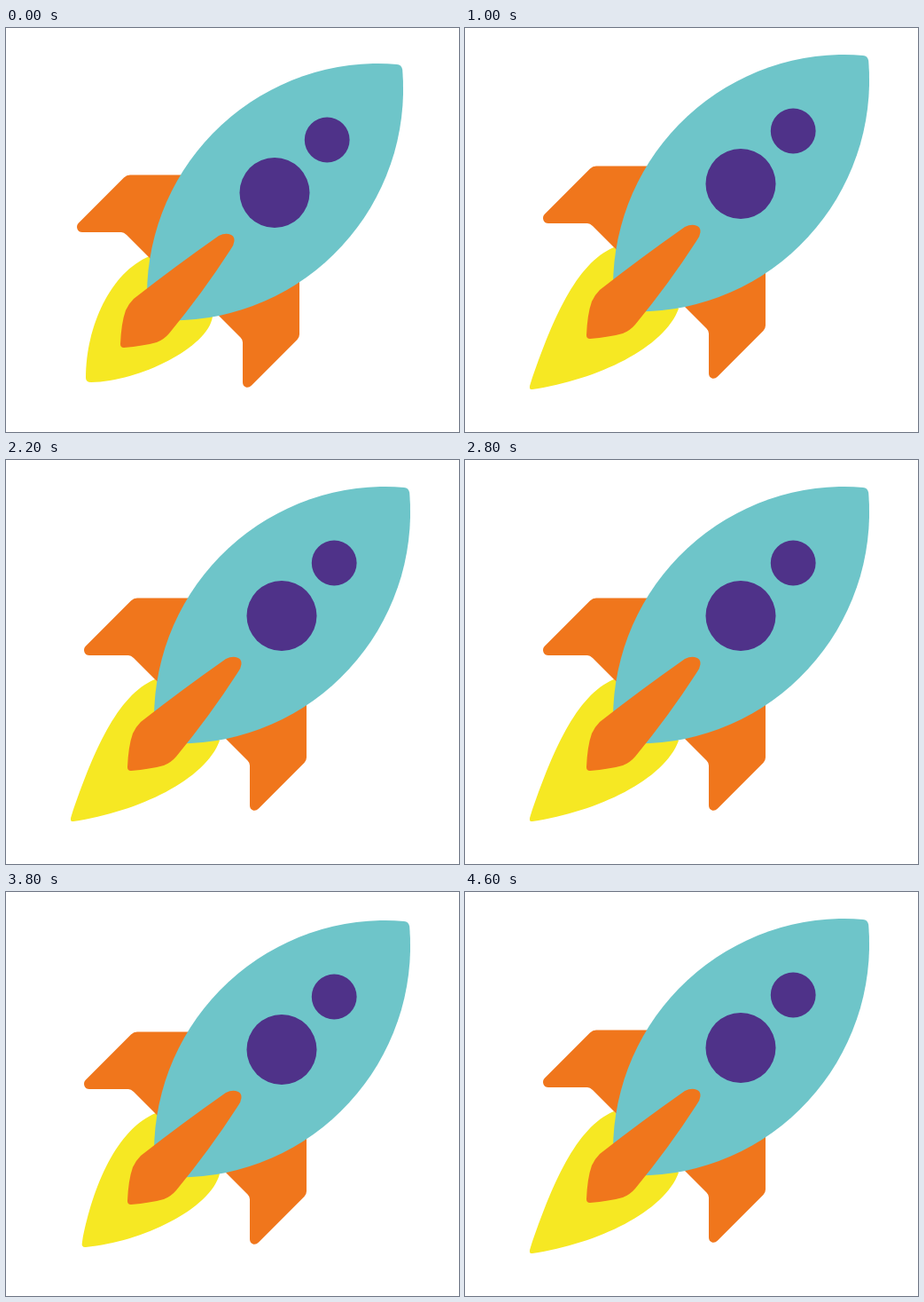
These frames come from a looping animation (511 px wide and 455 px high, 4800 ms). An HTML page with a canvas:

```html
<!DOCTYPE html>
<html lang="en">
<head>
<meta charset="utf-8">
<title>Rocket</title>
<style>
  html, body { margin: 0; width: 100%; height: 100%; overflow: hidden; background: #fff; }
  canvas { display: block; }
</style>
</head>
<body>
<canvas id="stage" width="511" height="455"></canvas>
<script>
const ctx = document.getElementById('stage').getContext('2d');
const STEP = 200;
const TEAL = '#6ec5c9', PURPLE = '#4f3289', ORANGE = '#f0761c', YELLOW = '#f6e823';

// Rocket offset and flame stretch for each pose
const poses = [
  { x: 0, y: 0, stretch: 0 },
  { x: 8, y: -8, stretch: 0.5 },
  { x: 8, y: -10, stretch: 1 }
];

const leftFin = new Path2D(`M215 165.5 H140 Q136 165.5 133 168.5 L82 219.5
  Q79 222.5 80.5 226.5 Q82 230 86 230 H130 Q133 230 136 233 L163 260 L220 230 Z`);
const rightFin = new Path2D(`M331 270 V345 Q331 348.5 328.5 351 L277 402.5
  Q274 405.5 270.5 404.5 Q267 403 267 399 V354 Q267 351 264.5 348.5 L238 322 L280 270 Z`);
const body = new Path2D(`M159 329 V301 A261 261 0 0 1 441 40.9
  Q446.5 41.5 447.2 47 A261 261 0 0 1 187 329.5 Z`);
const middleFin = new Path2D(`M240 234 Q246 231 251 232 Q258 233 257.5 240
  Q257 245 253 250 Q222 298 184 344 Q178 351 170 354 Q155 358 133 360
  Q129 360 129 356 Q130 332 135 318 Q138 311 144 305 Q190 269 240 234 Z`);

const shortFlame = [162, 257, 118, 275, 90, 336, 90, 394, 90, 399, 96, 399, 150, 398, 228, 360, 233, 325];
const longFlame = [160, 257, 117, 275, 90, 340, 66, 410, 63, 418, 68, 417, 142, 406, 217, 370, 233, 326];

function fill(color, path) {
  ctx.fillStyle = color;
  ctx.fill(path);
}

function disc(x, y, r) {
  const path = new Path2D();
  path.arc(x, y, r, 0, Math.PI * 2);
  fill(PURPLE, path);
}

function flame(k) {
  const p = shortFlame.map((v, i) => v + (longFlame[i] - v) * k);
  const path = new Path2D();
  path.moveTo(p[0], p[1]);
  path.bezierCurveTo(...p.slice(2, 8));
  path.quadraticCurveTo(...p.slice(8, 12));
  path.bezierCurveTo(...p.slice(12, 18));
  path.closePath();
  fill(YELLOW, path);
}

function draw(time) {
  const pose = poses[Math.floor(time / STEP) % poses.length];
  ctx.fillStyle = '#fff';
  ctx.fillRect(0, 0, 511, 455);
  ctx.save();
  ctx.translate(pose.x, pose.y);
  flame(pose.stretch);
  fill(ORANGE, leftFin);
  fill(ORANGE, rightFin);
  fill(TEAL, body);
  fill(ORANGE, middleFin);
  disc(303, 185.5, 39.5);
  disc(362.2, 126, 25.4);
  ctx.restore();
}

let start;
function tick(now) {
  if (start === undefined) start = now;
  draw(now - start);
  requestAnimationFrame(tick);
}
draw(0);
requestAnimationFrame(tick);
</script>
</body>
</html>
```
